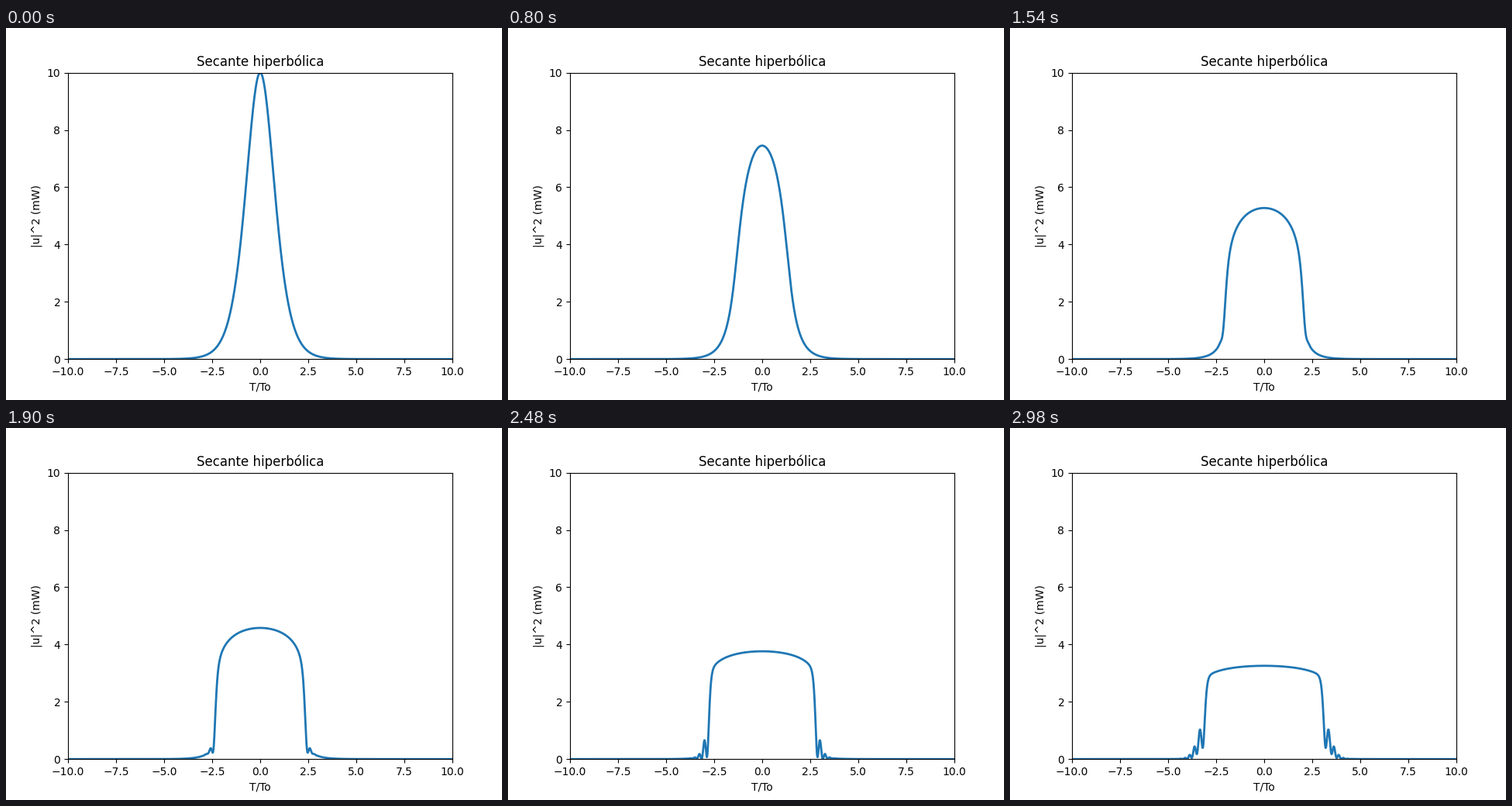
A matplotlib script that plays this animation: 640x480 px, repeating every 3 s.

```python
import numpy as np
import matplotlib.pyplot as plt
from matplotlib.animation import FuncAnimation

FRAMES = 150
INTERVAL = 20        # ms
P0 = 10.0            # peak power, mW
N_SOL = 15.0         # soliton order, normal dispersion
DXI = 0.001128       # distance per frame, in dispersion lengths
SUBSTEPS = 6

T = np.linspace(-20, 20, 4096, endpoint=False)
OMEGA = 2 * np.pi * np.fft.fftfreq(T.size, T[1] - T[0])


def propagate():
    """Symmetric split-step solution of the nonlinear Schrodinger equation."""
    h = DXI / SUBSTEPS
    half = np.exp(0.25j * OMEGA**2 * h)
    u = (1 / np.cosh(T)).astype(complex)
    powers = [P0 * np.abs(u)**2]
    for _ in range(FRAMES - 1):
        for _ in range(SUBSTEPS):
            u = np.fft.ifft(half * np.fft.fft(u))
            u *= np.exp(1j * N_SOL**2 * np.abs(u)**2 * h)
            u = np.fft.ifft(half * np.fft.fft(u))
        powers.append(P0 * np.abs(u)**2)
    return powers


powers = propagate()

fig, ax = plt.subplots(figsize=(6.4, 4.8), dpi=100)
ax.set(xlim=(-10, 10), ylim=(0, 10), title="Secante hiperbólica",
       xlabel="T/To", ylabel="|u|^2 (mW)")
line, = ax.plot(T, powers[0], lw=2)


def update(i):
    line.set_data(T, powers[i])
    return line,


anim = FuncAnimation(fig, update, frames=FRAMES, interval=INTERVAL,
                     repeat=True, repeat_delay=0)
plt.show()
```
